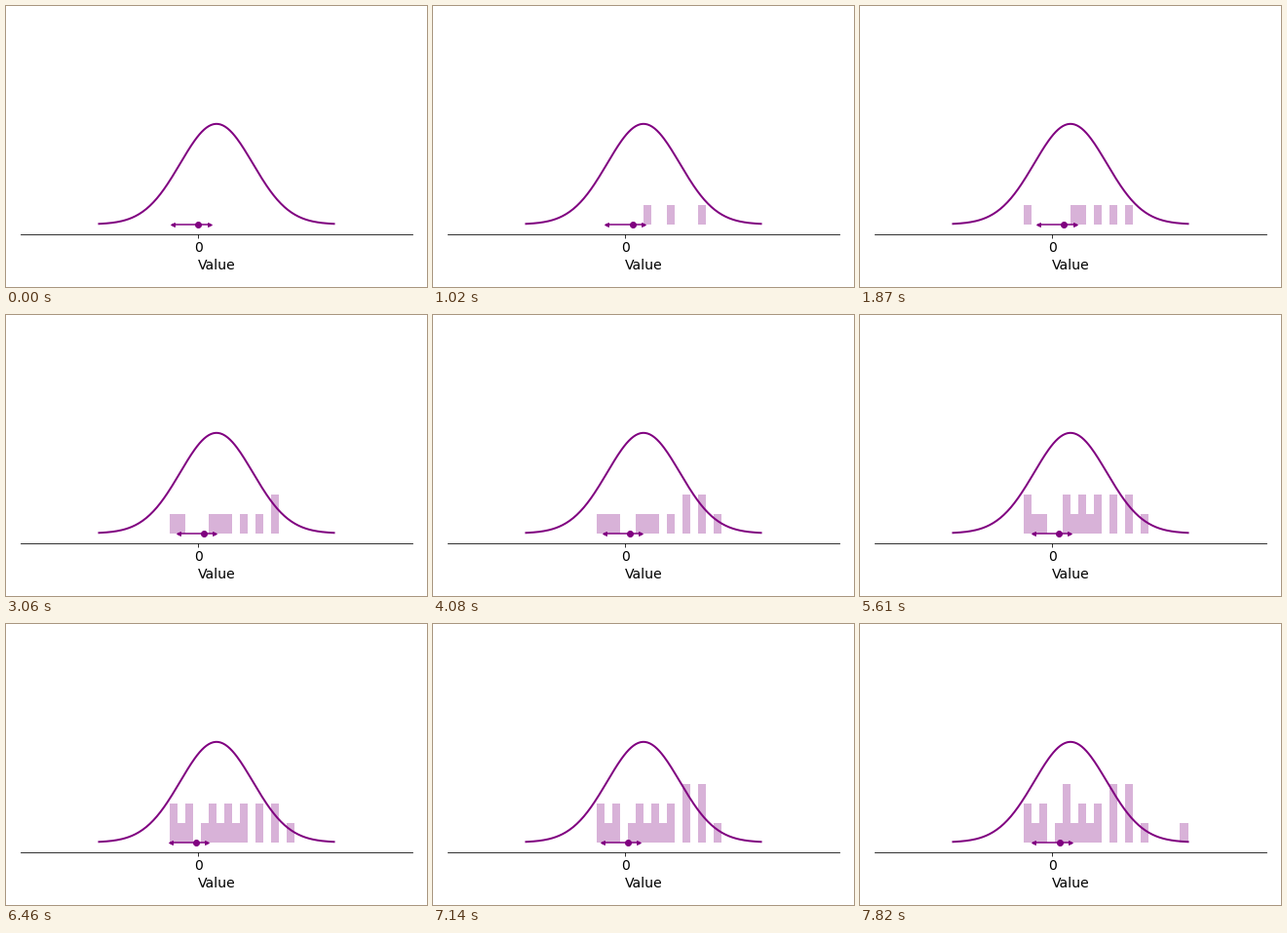
Write a matplotlib script that moves like this. It is 432 px wide and 288 px high and loops after 7990 ms.

```python
import numpy as np
import matplotlib.pyplot as plt
from matplotlib.animation import FuncAnimation

W, H, DPI = 432, 288, 72
COLOR = "purple"
FRAMES, INTERVAL = 47, 170

# Horizontal unit: one histogram bin. Vertical unit: one stacked sample.
SD = 4.63
MEAN, PEAK = SD / 2, 5.15
UP, DOWN = 0.3, 0.7
REACH = 4.67
BINS = [7, 3, 0, 5, 1, -6, -1, -5, 7, 5, 9, -4,
        2, -6, -1, 3, 1, -2, -4, 7, 5, -1, 14]

plt.rcParams.update({"font.family": "DejaVu Sans", "font.size": 14})


def walk(bins):
    """Estimate after each sample: small steps up, larger steps down."""
    path = [0.0]
    for b in bins:
        above = MEAN + b + 0.5 > path[-1]
        path.append(path[-1] + (UP if above else -DOWN))
    return path


path = walk(BINS)

fig = plt.figure(figsize=(W / DPI, H / DPI), dpi=DPI)
pad, floor, base, unit = 15.12, 53.6, 64.2, 20
ax = fig.add_axes([pad / W, floor / H, 1 - 2 * pad / W, (H - floor - pad) / H])
ax.set_xlim(MEAN - 25, MEAN + 25)
ax.set_ylim((floor - base) / unit, (H - pad - base) / unit)
ax.spines[["left", "top", "right"]].set_visible(False)
ax.set_xticks([0], ["0"])
ax.set_yticks([])
ax.set_xlabel("Value")

slots = sorted(set(BINS))
bars = ax.bar([MEAN + b for b in slots], [0] * len(slots), width=1,
              align="edge", color=COLOR, alpha=0.3, lw=0)

x = np.linspace(MEAN - 15, MEAN + 15, 200)
ax.plot(x, PEAK * np.exp(-((x - MEAN) / SD) ** 2 / 2), color=COLOR, lw=2)

shaft, = ax.plot([], [], color=COLOR, lw=1.5)
left, = ax.plot([], [], "<", color=COLOR, ms=4)
right, = ax.plot([], [], ">", color=COLOR, ms=4)
dot, = ax.plot([], [], "o", color=COLOR, ms=6)


def update(n):
    seen = BINS[:(n + 1) // 2]
    for slot, bar in zip(slots, bars):
        bar.set_height(seen.count(slot))
        bar.set_visible(slot in seen)
    pos = path[n // 2]
    lo, hi = pos - DOWN * REACH, pos + UP * REACH
    shaft.set_data([lo, hi], [0, 0])
    left.set_data([lo], [0])
    right.set_data([hi], [0])
    dot.set_data([pos], [0])
    return [*bars, shaft, left, right, dot]


anim = FuncAnimation(fig, update, frames=FRAMES, interval=INTERVAL,
                     init_func=lambda: update(0), repeat=True, repeat_delay=0)
plt.show()
```
